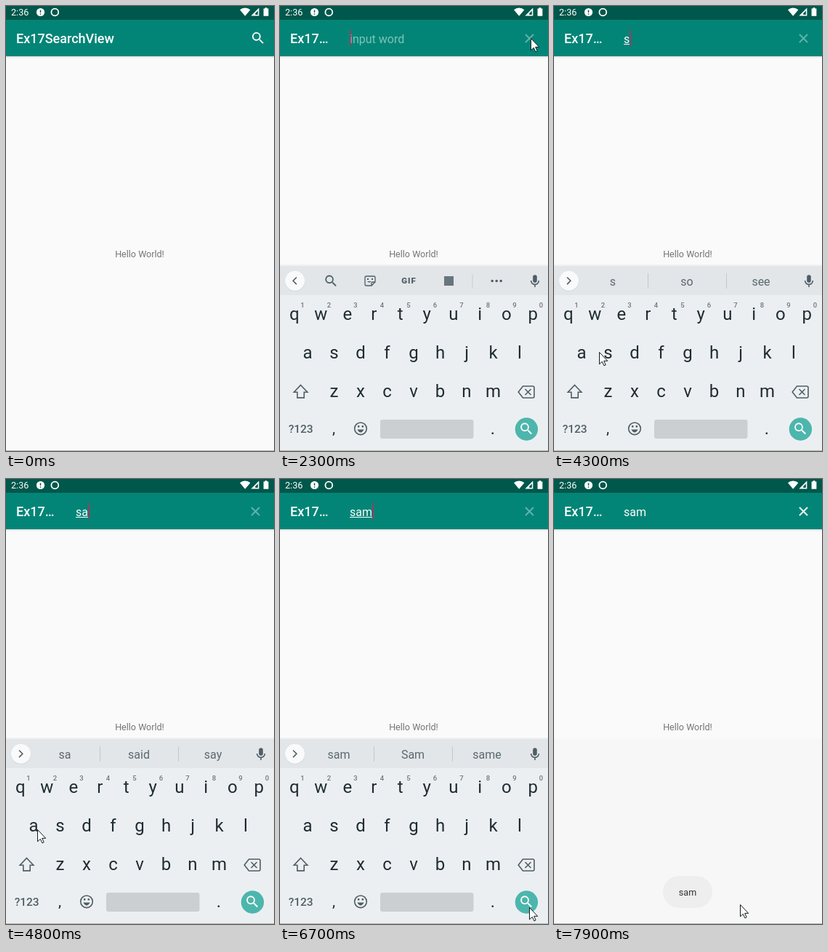
Write an HTML page that moves like this. It is 369 by 611 pixels and loops after 8 s.

```html
<!DOCTYPE html>
<html lang="en">
<head>
<meta charset="utf-8">
<title>Search view</title>
<style>
  html, body { margin: 0; width: 100%; height: 100%; overflow: hidden; background: #fafafa; }
  svg { display: block; width: 369px; height: 611px; font-family: Roboto, "Noto Sans", sans-serif; }
  text { white-space: pre; }
  .mid { text-anchor: middle; }
  .line { fill: none; stroke: #4f5e66; stroke-width: 1.6; }
  .dots { stroke: #4f5e66; stroke-width: 3.6; stroke-linecap: round; stroke-dasharray: 0 6; }
</style>
</head>
<body>
<svg viewBox="0 0 369 611">
  <defs>
    <linearGradient id="shade" x2="0" y2="1">
      <stop offset="0" stop-opacity=".12"/>
      <stop offset="1" stop-opacity="0"/>
    </linearGradient>
    <path id="lens" d="M15.5 14h-.8l-.3-.3A6.5 6.5 0 1 0 13.7 14.400l.3.3v.8l5 5 1.500-1.500zm-6 0a4.500 4.500 0 1 1 0-9 4.500 4.500 0 0 1 0 9z"/>
  </defs>

  <rect width="369" height="611" fill="#fafafa"/>
  <rect id="lower" y="356" width="369" height="255" fill="#f7f7f7"/>
  <rect y="69" width="369" height="3" fill="url(#shade)"/>
  <rect y="19" width="369" height="50" fill="#028577"/>
  <rect width="369" height="19" fill="#00574b"/>

  <g fill="#fff">
    <text x="7" y="13" font-size="12.6">2:36</text>
    <circle cx="47.5" cy="8.5" r="5.6"/>
    <path d="M47.5 5.4v3.7M47.5 10.3v1.5" stroke="#00574b" stroke-width="1.4"/>
    <circle cx="67.3" cy="8.5" r="4.9" fill="none" stroke="#fff" stroke-width="1.8"/>
    <path d="M322 5.2a11 11 0 0 1 14.4 0L329.2 13.8z"/>
    <path d="M348.4 2.5v11h-11z"/>
    <path d="M346.8 6.5v5.5h-3.5v-2z" fill="#00574b"/>
    <path d="M354.6 3.6h2v-1.3h2.8v1.3h2v10.2h-6.8z"/>
  </g>

  <text id="title" x="14" y="51" font-size="18" font-weight="500" fill="#fff"></text>
  <use id="open" href="#lens" fill="#fff" transform="translate(336.3 33.3) scale(.9)"/>
  <g id="search">
    <text id="query" x="96" y="50.6" font-size="16"></text>
    <rect id="under" x="96" y="52" height="1" fill="#fff"/>
    <rect id="caret" y="33" width="1.5" height="22" fill="#c9265f"/>
    <path id="close" d="M338 39l11 11M349 39l-11 11" stroke="#fff" stroke-width="1.8"/>
  </g>

  <text class="mid" x="184" y="345" font-size="12.56" fill="#757575">Hello World!</text>

  <g id="toast">
    <rect x="150" y="545" width="68" height="44" rx="22" fill="#eee"/>
    <text class="mid" x="184" y="572" font-size="12.56" fill="#303030">sam</text>
  </g>

  <g id="board">
    <rect y="355" width="369" height="2" opacity=".04"/>
    <rect y="357" width="369" height="254" fill="#eceff1"/>
    <rect y="357" width="369" height="40" fill="#e2e6e9"/>
    <circle cx="20.5" cy="378" r="13.8" fill="#d3d8db"/>
    <circle cx="20.5" cy="377.3" r="13.5" fill="#fafafa"/>
    <path id="chevron" class="line"/>

    <g id="tools" fill="#4f5e66">
      <use href="#lens" transform="translate(59.7 367) scale(.88)"/>
      <path class="line" d="M119 371h10q2 0 2 2v6l-5 5h-7q-2 0-2-2v-9q0-2 2-2zM131 379h-3q-2 0-2 2v3" style="stroke-width:1.3"/>
      <path d="M120 374h2v2h-2zM126 374h2v2h-2zM120 378h6q-3 3-6 0z"/>
      <text class="mid" x="177.5" y="381" font-size="11.5" font-weight="900" letter-spacing="1">GIF</text>
      <rect x="226" y="371" width="13" height="13" fill="#68757c"/>
      <path d="M265 368v20" stroke="#c8cdd0"/>
      <path class="dots" d="M292.200 377.500h12.100"/>
    </g>
    <g id="hints" class="mid" font-size="16" fill="#5c686f">
      <text x="81" y="383.5"></text>
      <text x="183" y="383.5"></text>
      <text x="285" y="383.5"></text>
      <path d="M129.5 367v21M237.5 367v21" stroke="#c3c8cb"/>
    </g>
    <rect x="348.2" y="369.2" width="5.6" height="10.5" rx="2.8" fill="#4f5e66"/>
    <path class="line" d="M345.6 377a5.4 5.4 0 0 0 10.8 0M351 382.5v3.5"/>

    <g id="keys" class="mid" font-size="24" fill="#1f2c33"></g>
    <path class="line" d="M28.5 520.500l9.300 9.800h-4.600v7.600h-9.400v-7.600h-4.600z"/>
    <path class="line" d="M334.5 522h13.500q2 0 2 2v12q0 2-2 2h-13.500l-6.300-8zM337.500 526l8 8M345.500 526l-8 8"/>
    <text class="mid" x="28.7" y="586" font-size="15.5" font-weight="500" fill="#4f5e66">?123</text>
    <circle class="line" cx="111" cy="580.3" r="8.3"/>
    <path d="M107 576h2.400v2.400h-2.400zM112.600 576h2.400v2.400h-2.400zM106.300 581.500h9.400q-4.700 8-9.400 0z" fill="#4f5e66"/>
    <rect x="138" y="568" width="128.5" height="26" rx="3" fill="#cbcfd1"/>
    <circle cx="339.4" cy="581" r="15.7" fill="#4db6ac"/>
    <use href="#lens" fill="#fff" transform="translate(328.5 569.7) scale(.9)"/>
  </g>

  <path d="M0 610.5h369" stroke="#b4b4b4"/>
  <path id="pointer" d="M.5.5v16.300l3.800-3.500 2.600 5.500 2.300-1-2.500-5.500h5z" fill="#fff" stroke="#10181c"/>
</svg>

<script>
const LOOP = 8000, STEP = 100, BLINK = 500;
const ENTER = 600, OPEN = 2100, SUBMIT = 7100;
const WORD = 'sam', TYPED = [4300, 4800, 5700];
const HINTS = ['s so see', 'sa said say', 'sam Sam same'];

// Pointer moves: start, end, target x, target y, sideways bow
const MOVES = [
  [ENTER, 1600, 345, 44, -12],
  [2300, 3000, 159, 72, 0],
  [3500, 4100, 62, 475, 65],
  [4600, 4800, 43, 481, 0],
  [4800, 5400, 296, 535, 0],
  [6300, 6700, 343, 588, 0],
  [7700, 7900, 256, 584, 0]
];

const $ = id => document.getElementById(id);
const set = (id, name, value) => $(id).setAttribute(name, value);
const show = (id, on) => set(id, 'display', on ? 'inline' : 'none');
const progress = (t, a, b) => Math.max(0, Math.min(1, (t - a) / (b - a)));
const smooth = k => k * k * (3 - 2 * k);

function buildKeys() {
  const pitch = 36.5;
  const key = (s, x, y, extra = '') => `<text x="${x}" y="${y}" ${extra}>${s}</text>`;
  const row = (chars, i) => [...chars].map((c, n) =>
    key(c, 184 + (n - (chars.length - 1) / 2) * pitch, 431 + i * 52.8)).join('');
  const digits = [...'1234567890'].map((c, n) =>
    key(c, 31 + n * pitch, 413.5, 'font-size="9.5" font-weight="500" fill="#6b777e"'));
  $('keys').innerHTML = ['qwertyuiop', 'asdfghjkl', 'zxcvbnm'].map(row).join('') +
    digits.join('') + key(',', 74, 587, 'font-size="21"') + key('.', 293, 588);
}

function pointerAt(t) {
  let x = 366, y = 86;
  for (const [a, b, toX, toY, bow] of MOVES) {
    const k = smooth(progress(t, a, b));
    x += (toX - x) * k + bow * Math.sin(Math.PI * k);
    y += (toY - y) * k;
  }
  return [Math.round(x), Math.round(y)];
}

function drawField(t) {
  const opened = t >= OPEN, sent = t >= SUBMIT;
  const count = TYPED.filter(at => at <= t).length;
  $('title').textContent = opened ? 'Ex17…' : 'Ex17SearchView';
  show('open', !opened);
  show('search', opened);
  $('query').textContent = count ? WORD.slice(0, count) : 'input word';
  set('query', 'fill', count ? '#fff' : '#80c2bb');
  set('close', 'opacity', sent ? 1 : .38);

  const width = count && opened ? $('query').getComputedTextLength() : 0;
  const since = t - (count ? TYPED[count - 1] : OPEN - 200);
  show('caret', !sent && Math.floor(since / BLINK) % 2 === 0);
  set('caret', 'x', 96 + width);
  show('under', !sent);
  set('under', 'width', width);
  return count;
}

function drawBoard(t, count) {
  const rise = progress(t, OPEN, OPEN + 200) - progress(t, SUBMIT, SUBMIT + 300);
  show('board', rise > 0);
  set('board', 'transform', `translate(0 ${256 * (1 - rise) ** 2})`);
  set('board', 'opacity', Math.min(1, rise * 1.5));
  show('tools', !count);
  show('hints', count);
  const words = count ? HINTS[count - 1].split(' ') : [];
  words.forEach((w, i) => { $('hints').children[i].textContent = w; });
  set('chevron', 'd', count ? 'M18 372.5l4.8 4.8-4.8 4.8' : 'M22.8 372.5l-4.8 4.8 4.8 4.8');
}

function draw(t) {
  drawBoard(t, drawField(t));
  show('lower', t >= SUBMIT);
  set('toast', 'opacity', progress(t, SUBMIT, SUBMIT + 500));
  show('pointer', t >= ENTER);
  set('pointer', 'transform', `translate(${pointerAt(t)})`);
}

buildKeys();
const start = performance.now();
function tick() {
  const t = (performance.now() - start) % LOOP;
  draw(Math.floor(t / STEP) * STEP);
  requestAnimationFrame(tick);
}
tick();
</script>
</body>
</html>
```
